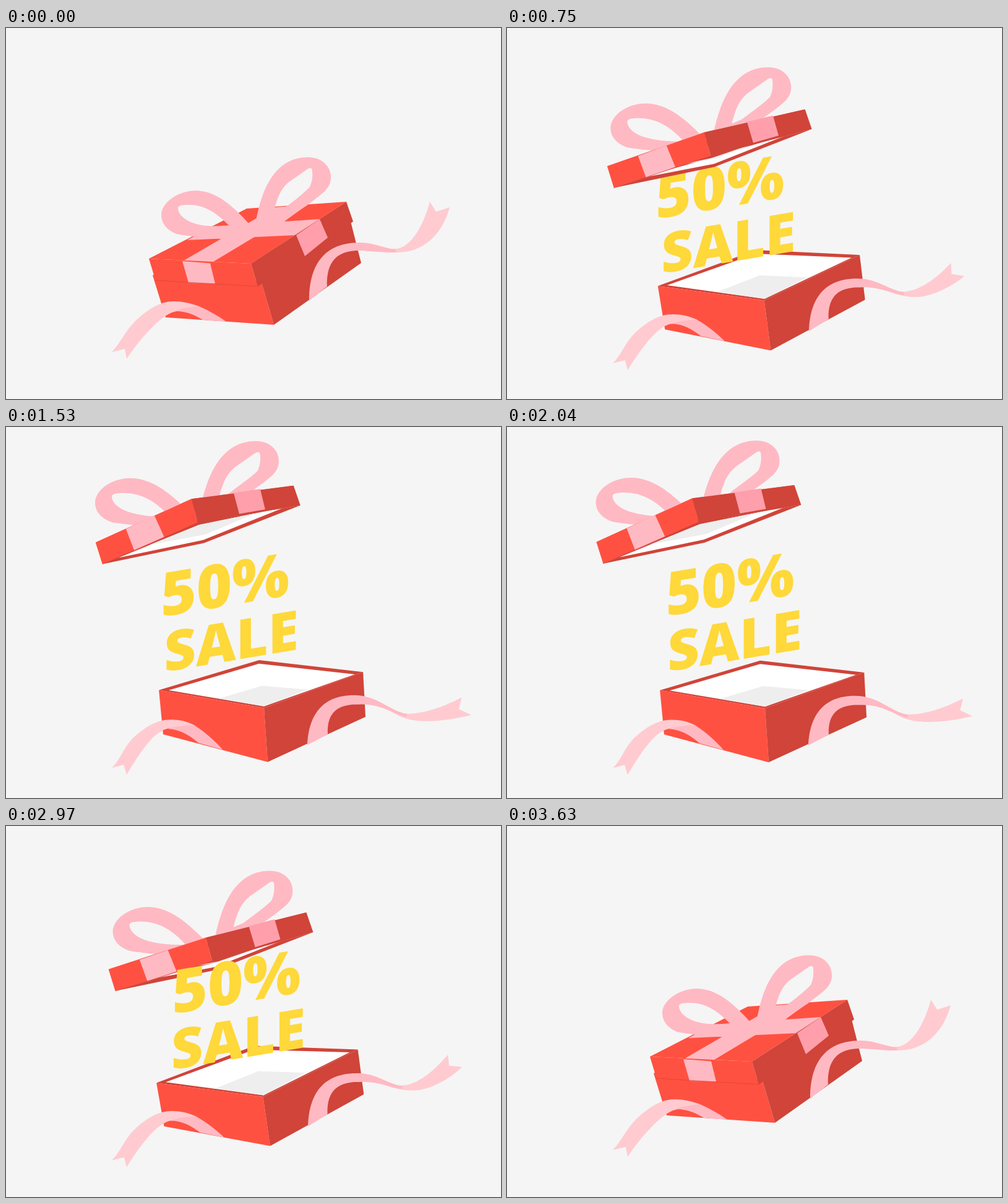
An HTML page with a canvas for the animation above (3690 ms loop, 800 by 600 pixels).

```html
<!DOCTYPE html>
<html lang="en">
<head>
<meta charset="utf-8">
<title>Gift box sale</title>
<style>
html, body { margin: 0; width: 100%; height: 100%; overflow: hidden; background: #f5f5f5; }
canvas { display: block; width: 800px; height: 600px; }
</style>
</head>
<body>
<canvas id="stage" width="800" height="600"></canvas>
<script>
const ctx = document.getElementById('stage').getContext('2d');
const LOOP = 3690, STEP = 30, HALF = 1815;
const RED = '#ff5141', DARK = '#d04439', WHITE = '#fff', SHADE = '#eee';
const PINK = '#ffb9c3', PALE = '#ffcbd0', ROSE = '#ff9fab', GOLD = '#ffd83a', PAPER = '#f5f5f5';

// Each shape holds a closed pose and an open pose with matching commands.
const shape = (color, closed, open) => {
  const numbers = path => path.match(/-?[\d.]+/g).map(Number);
  return { color, from: numbers(closed), to: numbers(open), commands: closed };
};

const boxParts = [
  shape(DARK, 'M237 400L389 322L555.5 307L413 412Z', 'M247.3 426.2L409.5 378.5L577.6 398.5L417.1 455.6Z'),
  shape(WHITE, 'M250.5 396L388 329L542.5 313L415 410Z', 'M263.2 426.6L409.5 384L564.3 402.2L417 452.8Z'),
  shape(SHADE, 'M398 362L479 358.7L415 410L330.6 401.4Z', 'M414.2 420L488 426.5L417 452.8L345 440Z'),
  shape(RED, 'M237 400L413 412L433 480L258 468Z', 'M247.3 426.2L417.1 455.6L422.7 543.2L253.9 497.8Z'),
  shape(DARK, 'M413 412L555.5 307L574 380L433 480Z', 'M417.1 455.6L577.6 398.5L581.2 471L422.7 543.2Z'),
  shape(PALE,
    'M171 524C185 510 192 490 212 471C232 453 250 442 271 442C285 442 298 445 312 450L272 459C250 464 215 505 195 535L192 519Z',
    'M171 552C185 539 190 518 207 502C225 486 243 474 266 474C280 474 294 477 306 484L266 488C240 488 215 530 195 563L190 547Z'),
  shape(PINK,
    'M271 458C285 453 298 451 312 450C328 457 342 465 356 475L318 472C305 464 290 457 271 458Z',
    'M262 489C275 484 292 483 304 483C320 493 337 508 350 523L311 512C298 501 283 490 262 489Z'),
  shape(PALE,
    'M625 357C655 360 676 315 685 281L695 297L717 290C709 320 690 350 655 360C645 363 630 364 605 362Z',
    'M643 466C670 470 710 456 738 442L733 461L753 471C730 476 700 480 680 479C662 479 640 476 620 460Z'),
  shape(PINK,
    'M490 441C490 395 505 347 572 347C595 347 612 357 630 358L630 363C612 363 595 361 575 360C548 359 517 366 519 418Z',
    'M487 516C489 472 508 436 562 436C600 436 620 462 648 467L648 472C625 467 605 449 570 451C542 450 518 459 520 499Z')
];

const lidTop = [
  shape(RED, 'M231 373L396 381L550 281L389 292Z', 'M144 185L299 114L464 93L309 164Z'),
  shape(PINK, 'M284 378L330 381L488 286L435 290Z', 'M193 163L239 141L404 121L354 143Z'),
  shape(PINK, 'M469 335L507 309L333 321L293 343Z', 'M367 104.5L410 98.5L250 172L208 177Z')
];
const bow = [
  shape(PINK,
    'M393 317C367 288 340 263 306 263C278 263 251 283 251 302C251 318 263 330 280 334C300 337 325 341 350 341L404 338ZM361 320C345 304 325 286 296 286C281 286 278 288 278 292C279 303 291 313 312 318C325 321 345 321 361 320Z',
    'M290 131C262 103 233 81 200 81C170 81 143 100 143 121C143 137 156 149 174 153C194 156 220 159 244 157L300 155ZM264 144C244 121 220 105 189 105C175 105 170 107 170 111C171 123 184 133 206 138C220 142 244 144 264 144Z'),
  shape(PINK,
    'M403 318C409 284 424 209 488 209C511 209 525 224 525 241C525 252 521 258 514 265C495 282 470 297 446 316ZM433 295C438 278 442 262 456 250L486 229C492 225 495 226 495 232C496 242 494 250 491 257C480 268 466 280 450 291Z',
    'M313 130C321 96 338 21 403 21C426 21 440 36 440 53C440 64 436 70 429 77C410 94 385 109 361 128ZM343 114C349 90 355 74 371 62L401 41C407 37 410 38 410 44C411 54 409 62 406 69C395 80 377 92 359 106Z')
];
const lidUnder = [
  shape(DARK, 'M241.5 408L407 418L561 313L398 375Z', 'M155 220L309 152L475 125L319 186Z'),
  shape(WHITE, 'M268 385L409 420L540 317L399 370Z', 'M181 210L311 156L450 128L318 181Z'),
  shape(SHADE, 'M300 380L409 420L490 340L402 362Z', 'M231 189L311 156L402 138L322 172Z')
];
const lidSides = [
  shape(RED, 'M231 373L396 381L407 418L241.5 408Z', 'M144 185L299 114L309 152.5L155 220Z'),
  shape(DARK, 'M396 381L550 281L561 313L407 418Z', 'M299 114L464 93L475 125L309 152.5Z'),
  shape(PINK, 'M285 377L330 380.5L338 413.5L295 412Z', 'M193 163L239 141L255 176L206.5 198Z'),
  shape(ROSE, 'M469 335L507 309L520 339L483 369Z', 'M367 104.5L410 98.5L418 131.5L376 138.5Z')
];
const lidEdge = shape(DARK, 'M241.5 408L407 418', 'M155 220L309 152.5');

const mix = (a, b, k) => a + (b - a) * k;
const clamp = v => Math.min(1, Math.max(0, v));

// Points far to the right, on the loose ribbon, trail a little behind.
function pose({ from, to, commands }, k) {
  let i = 0;
  return new Path2D(commands.replace(/-?[\d.]+/g, () => {
    const trail = 0.18 * clamp((from[i - i % 2] - 570) / 115);
    const value = mix(from[i], to[i], k - trail * k * (1 - k));
    return value.toFixed(2) + (i++ % 2 ? ' ' : ',');
  }));
}

function paint(parts, k) {
  for (const part of parts) {
    ctx.fillStyle = part.color;
    ctx.fill(pose(part, k), 'evenodd');
  }
}

function drawLine(text, size, x, y) {
  ctx.save();
  ctx.transform(1, -0.168, 0, 1, x, y);
  ctx.font = `800 ${size}px "Open Sans", sans-serif`;
  ctx.fillText(text, 0, 0);
  ctx.restore();
}

function drawText(t, lift) {
  const d = t - 450;
  ctx.save();
  if (t < HALF) {
    // Nothing shows above the rising lid.
    const dx = -87 * lift, dy = -188 * lift;
    ctx.beginPath();
    ctx.moveTo(0, 600);
    ctx.lineTo(0, 440 + dy);
    ctx.lineTo(231 + dx, 373 + dy);
    ctx.lineTo(550 + dx, 281 + dy);
    ctx.lineTo(800, 209 + dy);
    ctx.lineTo(800, 600);
    ctx.clip();
  }
  ctx.globalAlpha = 1 - clamp((t - 3060) / 240);
  ctx.fillStyle = GOLD;
  drawLine('50%', 98, 236.5 + d * 0.0127, 309.3 - d * 0.0021);
  drawLine('SALE', 89.2, 247 + d * 0.0079, 397.5 - d * 0.0013);
  ctx.restore();
}

function drawLid(lift) {
  paint(lidTop, lift);
  paint(bow, lift - 0.1 * (1 - lift) * Math.min(1, 3 * lift));
  if (lift > 0.6) paint(lidUnder, lift);
  paint(lidSides, lift);
  ctx.strokeStyle = DARK;
  ctx.lineWidth = 0.7;
  ctx.stroke(pose(lidEdge, lift));
}

function draw(t) {
  const m = t < 60 ? 0 : Math.max(0, Math.min(t, 2 * HALF - t));
  const tilt = 1 - (1 - m / HALF) ** 2;
  const lift = m < 450
    ? 0.628 * (m / 450) ** 1.6
    : 1 - 0.372 * ((HALF - m) / (HALF - 450)) ** 2.4;

  ctx.fillStyle = PAPER;
  ctx.fillRect(0, 0, 800, 600);
  paint(boxParts, tilt);
  if (t < HALF) drawText(t, lift);
  drawLid(lift);
  if (t >= HALF) drawText(t, lift);
}

const start = performance.now();
function tick() {
  const t = (performance.now() - start) % LOOP;
  draw(Math.floor(t / STEP) * STEP);
  requestAnimationFrame(tick);
}
tick();
</script>
</body>
</html>
```
